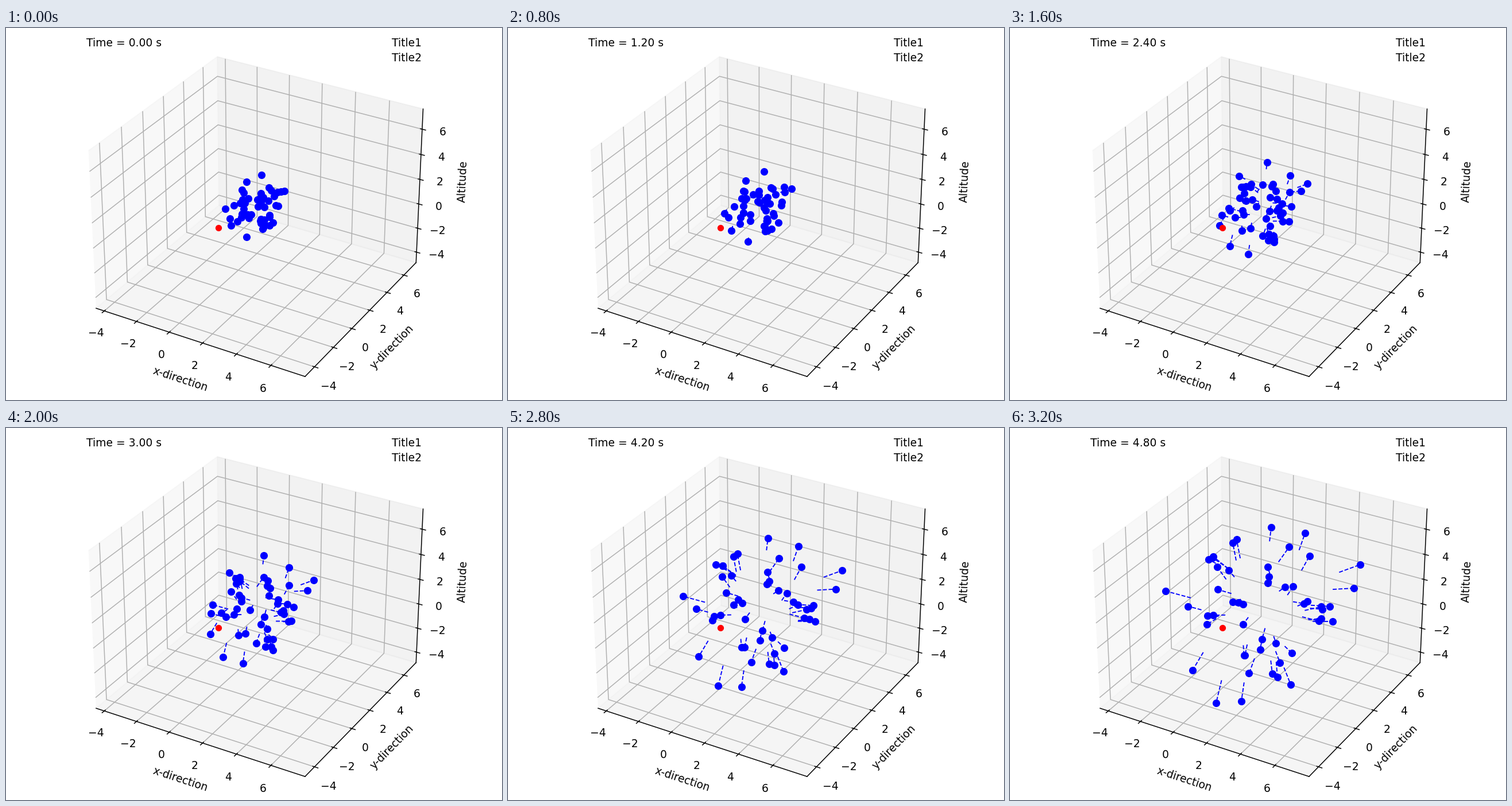
These frames come from a looping animation (864 px wide and 648 px high, 3.27 s). A matplotlib script:

```python
import numpy as np
import matplotlib.pyplot as plt
from matplotlib.animation import FuncAnimation

W, H, DPI = 864, 648, 135
LOOP_MS = 3270
STEPS = 48             # simulated steps; the last one is held for an extra beat
FRAMES = STEPS + 2
DT = 0.1               # simulated seconds per step
TAIL = 8               # trail length in steps
CENTER = (1.717, 1.254, 1.348)
HALF = 6.23            # half the width of the plotted cube

COUNT = 50
CORE = np.array([438, 308])    # middle of the swarm on the stage
CORE_RADIUS = 130              # final reach of the inner particles
PACKED = 0.25                  # size of the swarm at the start, relative to the end
JITTER = 28
EASE = 1.9                     # slow start, then an almost steady drift outwards
# Where the outermost particles end up
RIM = [(271, 284), (346, 229), (388, 200), (455, 173), (514, 183), (610, 238),
       (599, 279), (562, 337), (489, 447), (403, 476), (359, 479), (318, 422)]


def build_paths():
    """Positions of all particles, shaped (step, particle, xy)."""
    rng = np.random.default_rng(7)
    inner = COUNT - len(RIM)
    angle = rng.uniform(0, 2 * np.pi, inner)
    radius = CORE_RADIUS * np.sqrt(rng.uniform(0, 1, inner))
    disc = CORE + np.column_stack([radius * np.cos(angle), radius * np.sin(angle)])
    end = np.vstack([RIM, disc])
    start = CORE + PACKED * (end - CORE) + rng.uniform(-JITTER, JITTER, end.shape)
    grow = np.linspace(0, 1, STEPS + 1)[:, None, None] ** EASE
    return start + (end - start) * grow


def build_box(fig):
    ax = fig.add_axes([0, 0, 1, 1], projection="3d")
    for name, mid in zip("xyz", CENTER):
        ax.set(**{f"{name}lim": (mid - HALF, mid + HALF),
                  f"{name}ticks": range(-4, 7, 2)})
    ax.set(xlabel="x-direction", ylabel="y-direction", zlabel="Altitude")
    ax.text2D(0.87, 0.95, "Title1", transform=ax.transAxes)
    ax.text2D(0.87, 0.91, "Title2", transform=ax.transAxes)
    return ax


def build_overlay(fig):
    ax = fig.add_axes([0, 0, 1, 1])
    ax.set(xlim=(0, W), ylim=(H, 0))
    ax.axis("off")
    return ax


fig = plt.figure(figsize=(W / DPI, H / DPI), dpi=DPI)
box = build_box(fig)
clock = box.text2D(0.05, 0.95, "", transform=box.transAxes)

paths = build_paths()
stage = build_overlay(fig)
trails = [stage.plot([], [], "b--", lw=1)[0] for _ in range(COUNT)]
dots, = stage.plot([], [], "bo", ms=6)
stage.plot(370.2, 348.4, "ro", ms=5)


def update(i):
    step = min(i, STEPS)
    clock.set_text(f"Time = {step * DT:.2f} s")
    dots.set_data(*paths[step].T)
    recent = paths[max(0, step - TAIL):step + 1]
    for k, trail in enumerate(trails):
        trail.set_data(*recent[:, k].T)
    return [clock, dots, *trails]


anim = FuncAnimation(fig, update, frames=FRAMES, interval=LOOP_MS / FRAMES,
                     repeat=True, repeat_delay=0)
plt.show()
```
